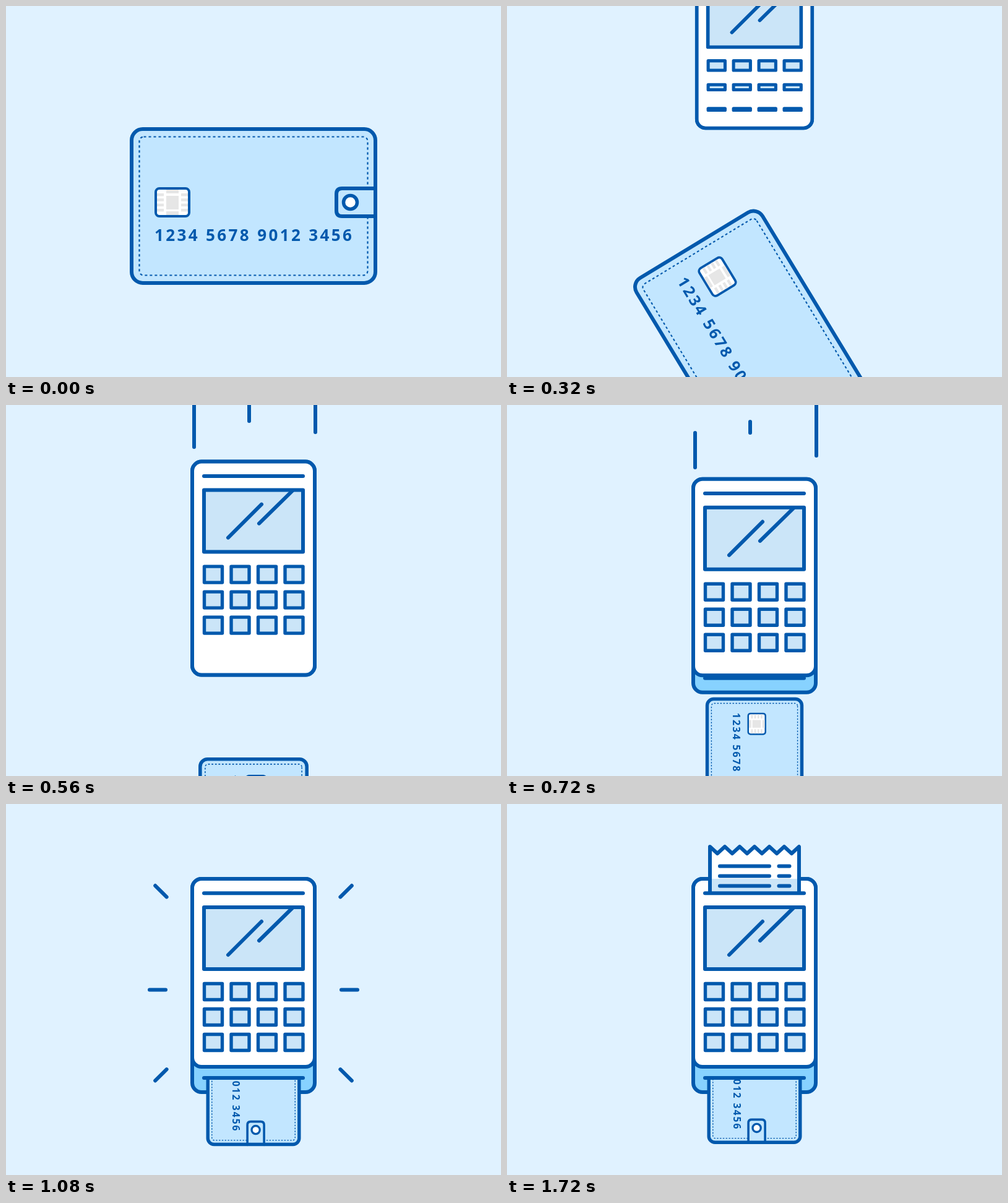
An HTML page for the animation above (1.76 s loop, 800 by 600 pixels).

```html
<!DOCTYPE html>
<html lang="en">
<head>
<meta charset="utf-8">
<title>Card payment</title>
<style>
  html, body { margin: 0; width: 100%; height: 100%; overflow: hidden; background: #e0f2ff; }
  svg { display: block; width: 100%; height: 100%; }
  .ink { stroke: #0259ad; stroke-width: 6; stroke-linecap: round; stroke-linejoin: round; fill: none; }
  .number { font: 700 26px "Open Sans", "Noto Sans", sans-serif; letter-spacing: 3.4px; fill: #0259ad; }
</style>
</head>
<body>
<svg viewBox="0 0 800 600">
  <defs>
    <clipPath id="belowSlot"><rect id="cardWindow" width="800" height="1000"/></clipPath>
    <clipPath id="aboveSlot"><rect width="800" height="144"/></clipPath>
    <clipPath id="onTerminal"><rect y="121" width="800" height="23"/></clipPath>
  </defs>

  <g id="burst" class="ink"></g>
  <g id="speed" class="ink"></g>

  <g id="base" class="ink">
    <rect id="baseBody" x="301" y="3" width="198" rx="15" fill="#87d2ff"/>
  </g>

  <g clip-path="url(#belowSlot)">
    <g id="card" class="ink">
      <rect x="202" y="198" width="396" height="251" rx="19" fill="#c2e6ff" stroke="none"/>
      <rect x="215.5" y="211.5" width="369" height="224" rx="7"
        style="stroke-width:2.2;stroke-linecap:butt" stroke-dasharray="4 4"/>
      <rect x="242" y="295" width="54" height="45" rx="6" fill="#fff" style="stroke-width:4"/>
      <g id="chip" fill="#e6e6e6" stroke="none"></g>
      <text class="number" x="240" y="380" stroke="none">1234 5678 9012 3456</text>
      <path d="M597 295H543Q534 295 534 304V331Q534 340 543 340H597" fill="#c2e6ff"/>
      <circle cx="556.5" cy="317.5" r="11" fill="#fff" style="stroke-width:5.5"/>
      <rect id="cardOutline"/>
    </g>
  </g>

  <g id="slot" class="ink"><path d="M320 325H480"/></g>

  <g id="face" class="ink">
    <rect id="faceBody" x="301" y="3" width="198" rx="15" fill="#fff"/>
    <rect x="320" y="49" width="160" height="100" fill="#cbe5f8"/>
    <path id="glare"/>
    <path d="M409 103L463 50"/>
    <g id="keys" fill="#cbe5f8" style="stroke-width:5.4"></g>
  </g>

  <g id="receipt" class="ink" clip-path="url(#aboveSlot)">
    <path id="paper" fill="#fff" stroke="none"/>
    <path id="shade" fill="#cbe5f8" stroke="none" clip-path="url(#onTerminal)"/>
    <path id="paperEdge"/>
    <path id="print"/>
  </g>
  <g id="printer" class="ink"><path d="M320 26.3H480"/></g>
</svg>

<script>
const LOOP = 1760, STEP = 40;
const $ = id => document.getElementById(id);
const set = (node, attrs) => { for (const k in attrs) node.setAttribute(k, attrs[k]); };
const add = (parent, tag, attrs = {}) => {
  const node = document.createElementNS("http://www.w3.org/2000/svg", tag);
  set(node, attrs);
  return parent.appendChild(node);
};
const mix = (a, b, p) => a + (b - a) * p;

// Progress from start to end along a cubic Bezier (x1, 0, x2, 1).
function ease(t, start, end, x1 = .33, x2 = .67) {
  const x = (t - start) / (end - start);
  if (x <= 0) return 0;
  if (x >= 1) return 1;
  let lo = 0, hi = 1;
  for (let i = 0; i < 24; i++) {
    const s = (lo + hi) / 2, r = 1 - s;
    if (3 * s * r * r * x1 + 3 * s * s * r * x2 + s * s * s < x) lo = s; else hi = s;
  }
  return lo * lo * (3 - 2 * lo);
}

// Straight interpolation through [time, value] points.
function through(points, t) {
  let i = 1;
  while (i < points.length - 1 && t > points[i][0]) i++;
  const [t0, v0] = points[i - 1], [t1, v1] = points[i];
  return mix(v0, v1, (t - t0) / (t1 - t0));
}

const keyRows = [0, 1, 2].map(row => [0, 1, 2, 3].map(col =>
  add($("keys"), "rect", { x: 320.5 + 43.5 * col, y: 172.5 + 41 * row, width: 29 })));

const chipPart = (x, y, width, height) => add($("chip"), "rect", { x, y, width, height });
chipPart(259, 307, 20, 22);
chipPart(259, 297, 20, 6);
chipPart(259, 332, 20, 6);
for (let i = 0; i < 4; i++) {
  chipPart(244, 303 + 8.3 * i, 11, 4.5);
  chipPart(283, 303 + 8.3 * i, 11, 4.5);
}

const speedLines = [
  { x: 304, tail: [[600, -6], [720, 45], [840, 110]], tip: [[480, 36], [560, 68], [720, 101], [840, 110]] },
  { x: 393, tail: [[640, -6], [720, 27], [780, 50]], tip: [[480, 4], [560, 26], [720, 45], [780, 50]] },
  { x: 500, tail: [[720, -6], [880, 104]], tip: [[480, 2], [560, 44], [720, 82], [880, 104]] }
].map(line => ({ ...line, node: add($("speed"), "path") }));

const rays = [-1, 1].flatMap(side => [
  { x: 400 + 40 * side, y: 250.8, dx: side * Math.SQRT1_2, dy: -Math.SQRT1_2 },
  { x: 400, y: 300.5, dx: side, dy: 0 },
  { x: 400 + 40 * side, y: 328.7, dx: side * Math.SQRT1_2, dy: Math.SQRT1_2 }
]).map(ray => ({ ...ray, node: add($("burst"), "path") }));

function drawCard(t, slotY) {
  const y = t <= 520
    ? mix(323.5, 712, ease(t, 0, 520, .52, .67))
    : mix(712, 430, ease(t, 528, 1164, .33, .25));
  const scale = mix(1, .6, ease(t, 205, 895, .33, .3));
  const angle = 90 * ease(t, 0, 520, .37, .67);
  const stroke = (4.5 + 1.5 * scale) / scale;
  set($("card"), { transform: `translate(400 ${y}) rotate(${angle}) scale(${scale}) translate(-400 -323.5)` });
  set($("cardOutline"), {
    x: 200 + stroke / 2, y: 196 + stroke / 2,
    width: 400 - stroke, height: 255 - stroke, rx: 21 - stroke / 2
  });
  $("cardOutline").style.strokeWidth = stroke;
  set($("cardWindow"), { y: t < 560 ? -100 : slotY });
}

function drawTerminal(t) {
  const top = mix(-360, 118, ease(t, 8, 765, .33, .3));
  const scale = mix(.9, 1, ease(t, 160, 520));
  const place = { transform: `translate(400 ${top}) scale(${scale}) translate(-400 0)` };
  for (const id of ["base", "slot", "face", "printer"]) set($(id), place);

  const height = mix(264, 345, ease(t, 220, 520));
  set($("baseBody"), { height });
  set($("faceBody"), { height: height - 41 * ease(t, 560, 820) });
  set($("slot"), { visibility: t > 560 ? "visible" : "hidden" });

  keyRows.forEach((row, i) => {
    const start = 181 + 48 * i;
    for (const key of row) set(key, { height: mix(.5, 26, ease(t, start, start + 240)) });
  });
  const reach = 54 * ease(t, 100, 350);
  set($("glare"), { d: `M413 72L${413 - reach} ${72 + reach}` });
  return top + 325;
}

function drawLines(t) {
  for (const { x, tail, tip, node } of speedLines) {
    const from = Math.max(-20, through(tail, t)), to = through(tip, t);
    set(node, { d: t >= 480 && t < tail[tail.length - 1][0] && from < to ? `M${x} ${from}V${to}` : "" });
  }
  const outer = 255 - 87 * ((1624 - Math.min(t, 1624)) / 544) ** 3;
  const u = (t - 1360) / 280;
  const inner = 192 + 56.5 * u + 6.5 * u * u;
  for (const { x, y, dx, dy, node } of rays) {
    const at = d => `${x + dx * d} ${y + dy * d}`;
    set(node, { d: t > 1000 && inner < outer ? `M${at(inner)}L${at(outer)}` : "" });
  }
}

function drawReceipt(t) {
  const out = ease(t, 1212, 1722);
  const top = mix(148, 69, out) - 4 * (1 - out) * out;
  const teeth = 11 * Math.min(1, out * 1.4);
  let edge = "M328 160";
  for (let i = 0; i <= 12; i++) edge += `L${328 + 12 * i} ${top + (i % 2) * teeth}`;
  edge += "V160";
  for (const id of ["paper", "shade", "paperEdge"]) set($(id), { d: edge });
  set($("print"), {
    d: [31.5, 47.5, 63.5].map(y => `M344 ${top + y}H424M439.5 ${top + y}H456.5`).join("")
  });
  set($("receipt"), { visibility: out > 0 ? "visible" : "hidden" });
}

function draw(time) {
  const t = Math.floor((time % LOOP) / STEP) * STEP;
  drawCard(t, drawTerminal(t));
  drawLines(t);
  drawReceipt(t);
}

const begin = performance.now();
(function tick() {
  draw(performance.now() - begin);
  requestAnimationFrame(tick);
})();
</script>
</body>
</html>
```
